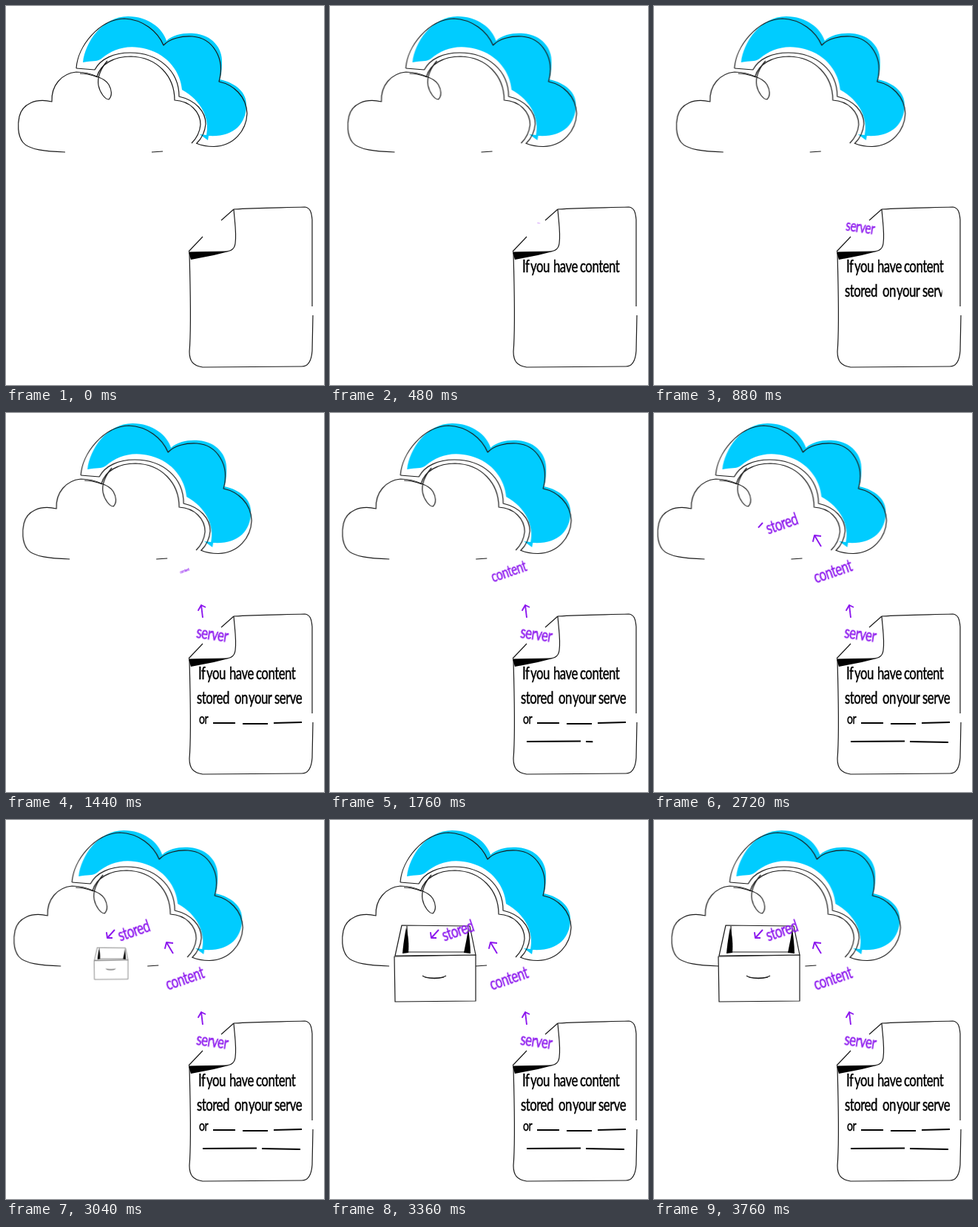
These frames come from a looping animation (430x511 px, 3840 ms). An HTML page:

```html
<!DOCTYPE html>
<html lang="en">
<head>
<meta charset="utf-8">
<title>Cloud storage sketch</title>
<style>
  html, body { margin: 0; width: 100%; height: 100%; overflow: hidden; background: #fff; }
  svg { display: block; width: 430px; height: 511px; }
  path { fill: none; stroke: #1a1a1a; stroke-width: 1.2; stroke-linejoin: round; }

  /* Tall, narrow lettering */
  text {
    font: 400 24px Lato, "Open Sans", sans-serif;
    letter-spacing: -.7px;
    stroke: #000;
    stroke-width: .5;
    transform: scaleX(.7);
    transform-box: fill-box;
    transform-origin: left;
  }
  .small { font-size: 20px; }

  .blue { fill: #00ccff; stroke: none; }
  .ink { fill: #000; stroke: none; }
  .paper { fill: #fff; }
  .rule path { stroke: #000; stroke-width: 2; }
  .word text { fill: #8c17ee; stroke: #8c17ee; text-anchor: middle; transform-origin: center; }
  .arrow { stroke: #8c17ee; stroke-width: 1.9; stroke-dasharray: 1 2; }

  /* The clock ticks every 80 ms, so each segment counts its own steps. */
  .cloud, .rule, .pop, .arrow { animation: 3840ms step-end infinite; }
  .pop { transform-box: fill-box; transform-origin: center; }

  .cloud { animation-name: drift; }
  @keyframes drift {
    0% { transform: translateX(0); animation-timing-function: steps(12); }
    24.99% { transform: translateX(15px); animation-timing-function: steps(20); }
    66.66% { transform: translateX(-14.5px); animation-timing-function: steps(16); }
    100% { transform: translateX(8.8px); }
  }

  .rule { --hid: inset(-9px 100% -9px -2px); --out: inset(-9px -2px -9px -2px); }
  #line1 { animation-name: line1; }
  #line2 { animation-name: line2; }
  #line3 { animation-name: line3; }
  #line4 { animation-name: line4; }
  @keyframes line1 {
    0% { clip-path: var(--hid); animation-timing-function: steps(6); }
    12.49%, 100% { clip-path: var(--out); }
  }
  @keyframes line2 {
    0% { clip-path: var(--hid); }
    12.49% { clip-path: var(--hid); animation-timing-function: steps(5); }
    22.91% { clip-path: inset(-9px 8% -9px -2px); }
    24.99%, 100% { clip-path: var(--out); }
  }
  @keyframes line3 {
    0% { clip-path: var(--hid); }
    24.99% { clip-path: var(--hid); animation-timing-function: steps(6); }
    37.49%, 100% { clip-path: var(--out); }
  }
  @keyframes line4 {
    0% { clip-path: var(--hid); }
    37.49% { clip-path: var(--hid); animation-timing-function: steps(6); }
    49.99%, 100% { clip-path: var(--out); }
  }

  #server { animation-name: server; }
  #content { animation-name: content; }
  #stored { animation-name: stored; }
  #drawer { animation-name: drawer; }
  @keyframes server {
    0% { transform: scale(0); }
    12.49% { transform: scale(.083); animation-timing-function: steps(5); }
    22.91% { transform: scale(.917); }
    24.99%, 100% { transform: scale(1); }
  }
  @keyframes content {
    0% { transform: scale(0); }
    35.41% { transform: scale(.083); animation-timing-function: steps(5); }
    45.83% { transform: scale(.917); }
    47.91%, 100% { transform: scale(1); }
  }
  @keyframes stored {
    0% { transform: scale(0); }
    56.24% { transform: scale(.083); animation-timing-function: steps(5); }
    66.66% { transform: scale(.917); }
    68.74%, 100% { transform: scale(1); }
  }
  @keyframes drawer {
    0% { transform: scale(0); }
    74.99% { transform: scale(.083); animation-timing-function: steps(5); }
    85.41% { transform: scale(.917); }
    87.49%, 100% { transform: scale(1); }
  }

  #arrow1 { animation-name: arrow1; }
  #arrow2 { animation-name: arrow2; }
  #arrow3 { animation-name: arrow3; }
  @keyframes arrow1 {
    0% { stroke-dashoffset: 1; }
    24.99% { stroke-dashoffset: 1; animation-timing-function: steps(4); }
    33.33%, 100% { stroke-dashoffset: 0; }
  }
  @keyframes arrow2 {
    0% { stroke-dashoffset: 1; }
    47.91% { stroke-dashoffset: 1; animation-timing-function: steps(4); }
    56.24%, 100% { stroke-dashoffset: 0; }
  }
  @keyframes arrow3 {
    0% { stroke-dashoffset: 1; }
    68.74% { stroke-dashoffset: 1; animation-timing-function: steps(4); }
    77.08%, 100% { stroke-dashoffset: 0; }
  }
</style>
</head>
<body>
<svg viewBox="0 0 430 511">
  <g class="cloud">
    <path class="blue" d="M104 76C107 49 130 14 165 14C192 14 212 30 217 47C226 38 242 36 254 37C279 39 293 57 292 76C292 86 291 93 289 99C312 104 325 117 325 133C325 160 307 177 274 175L273 181L262 173L271 174C276 152 264 127 238 113C236 90 220 66 190 58C164 51 145 58 129 71C122 76 117 73 104 76Z"/>
    <path d="M95 84C97 54 126 18 160 17C185 18 205 34 213 53C221 44 238 40 252 41C279 43 297 70 288 102C307 106 325 121 326 145C325 168 308 189 281 189.5C272 189.5 264 188 257 185" stroke-width="1.1"/>
    <path d="M95 84L120 86C128 71 146 63 168 63C206 63 234 87 234 122C256 127 270 142 270 159C269 170 265 178 258 185"/>
    <path d="M80 197C54 196 31 194 23 184C15 174 16 158 18 149C22 132 40 124 62 129C61 107 75 91 95 89C105 89 114 91 123 95" stroke-width="1.5"/>
    <path d="M100 91C108 91 116 93 124 96M123 95C128 78 146 68 169 68C204 69 228 94 228 127C249 128 263 143 263 160C262 171 257 179 251 185" stroke-width="1.1"/>
    <path d="M137 74C128 84 123 97 125 107C127 117 134 126 139 126C144 121 143 113 139 106C135 100 130 98 123 95" stroke-width="2.1"/>
    <path d="M197 197L212 196" stroke-width="1.7"/>
  </g>

  <g id="page">
    <path d="M308 274C340 272 373 272 404 271C411 272 413 277 414 288L414 405M415 417L414 465C413 479 409 486 400 486L266 487C253 485 248 479 248 466C251 430 249 380 248 332"/>
    <path d="M308 274L291 289M266 311L247 331M308 274C309 290 312 306 310 320C309 328 304 331 296 331L247 332"/>
    <path class="ink" d="M247 332L301 331L281 336L250 342Z"/>
  </g>

  <g id="line1" class="rule">
    <text x="260" y="359.5">If</text>
    <text x="271" y="359.5">you</text>
    <text x="302" y="359.5">have</text>
    <text x="338" y="359.5">content</text>
  </g>
  <g id="line2" class="rule">
    <text x="258" y="392.5">stored</text>
    <text x="309" y="392.5">on</text>
    <text x="328" y="392.5">your</text>
    <text x="363" y="392.5">serve</text>
  </g>
  <g id="line3" class="rule">
    <text class="small" x="261" y="419">or</text>
    <path d="M280 418L310 418M320 419L354 419M362 418L400 417"/>
  </g>
  <g id="line4" class="rule">
    <path d="M266 443L339 442.5M346 443L398 444"/>
  </g>

  <g id="drawer" class="pop">
    <path class="paper" d="M97 142L189 143L197 182L88 183Z"/>
    <path d="M105 178L182 178M104 143L105 178"/>
    <path class="ink" d="M103 145C106 155 107 168 106 179L98 180C99 168 101 155 103 145Z"/>
    <path class="ink" d="M187 144C188 156 190 168 190 180L181 179C183 168 186 156 187 144Z"/>
    <path class="paper" d="M87 184L197 182L197 244L88 245Z"/>
    <path d="M125 210C130 214 151 214 157 210M128 212C137 214 146 214 154 212"/>
  </g>

  <g class="word" transform="translate(278.5 300) rotate(8)"><g id="server" class="pop"><text y="6">server</text></g></g>
  <g class="word" transform="translate(242 215.5) rotate(-19)"><g id="content" class="pop"><text y="6">content</text></g></g>
  <g class="word" transform="translate(173 150) rotate(-19)"><g id="stored" class="pop"><text y="7">stored</text></g></g>

  <path id="arrow1" class="arrow" pathLength="1" d="M266 276L264 259L260 266L264 259L270 262"/>
  <path id="arrow2" class="arrow" pathLength="1" d="M226 180L217 165L215 173L217 165L226 166"/>
  <path id="arrow3" class="arrow" pathLength="1" d="M147 148L137 159L136 152L137 159L144 159"/>
</svg>
</body>
</html>
```
